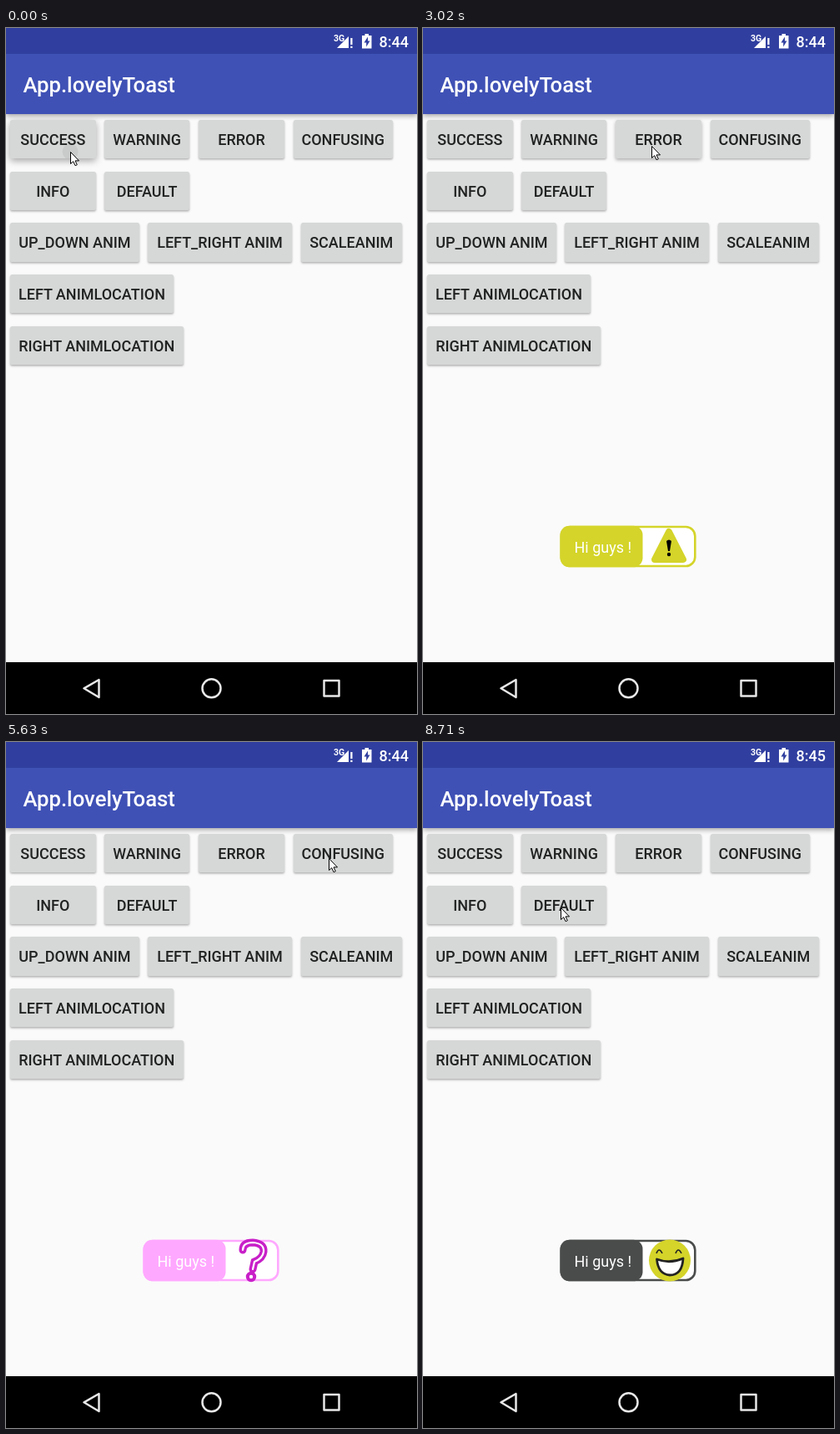
An HTML page that plays this animation: 493x821 px, repeating every 9090 ms.

```html
<!DOCTYPE html>
<html lang="en">
<head>
<meta charset="utf-8">
<title>Toast demo</title>
<style>
  html, body { margin: 0; width: 100%; height: 100%; overflow: hidden; background: #fafafa; }
  #stage { position: absolute; left: 0; top: 0; width: 493px; height: 821px; overflow: hidden; font-family: Roboto, sans-serif; }
  #stage > * { position: absolute; }
  #status { left: 0; top: 0; width: 493px; height: 31px; background: #303f9f; }
  #bar { left: 0; top: 30.8px; width: 493px; height: 71.9px; background: #3f51b5; box-shadow: 0 2px 6px rgba(0,0,0,.36); }
  #nav { left: 0; top: 759.4px; width: 493px; height: 62px; background: #000; }
  .button { height: 46.2px; border-radius: 2.6px; background: #d6d7d7; overflow: hidden;
    color: #202121; font-weight: 500; font-size: 18px; line-height: 47px; text-align: center; white-space: nowrap; }
  .button i { position: absolute; border-radius: 50%; background: #000; transform: translate(-50%, -50%); }
  svg { left: 0; top: 0; }
</style>
</head>
<body>
<div id="stage">
  <div id="bar"></div>
  <div id="status"></div>
  <div id="nav"></div>
  <svg id="overlay" width="493" height="821" viewBox="0 0 493 821">
    <g fill="#fff" font-weight="500">
      <text x="20.5" y="77" font-size="25.7">App.lovelyToast</text>
      <text x="393" y="15.5" font-size="10.5" font-weight="700">3G</text>
      <path d="M397 24L411 10V24Z"/>
      <path d="M413.3 12h2.2v8h-2.2zM413.3 21.8h2.2V24h-2.2z"/>
      <path d="M427 9h3.5V7h4.5v2h3.5v15.5H427Z"/>
      <path d="M434 10.5l-4.5 7h2.7v5l4.3-7h-2.5Z" fill="#303f9f"/>
      <text id="clock" x="447.5" y="22.5" font-size="18">8:44</text>
    </g>
    <g fill="none" stroke="#e8e8e8" stroke-width="2.5" stroke-linejoin="round">
      <path d="M93.5 790.3L111.5 780V801Z"/>
      <circle cx="246.5" cy="790.3" r="11"/>
      <rect x="381.5" y="781" width="18" height="18.5"/>
    </g>
    <g id="toasts"></g>
    <path id="cursor" d="M0 0V14L3.2 11.2L5.6 16.2L7.8 15.2L5.5 10.4H10Z" fill="#fff" stroke="#000"/>
  </svg>
</div>
<script>
const LOOP = 9090, SWAP = 720;
const byId = id => document.getElementById(id);
const clamp = v => Math.max(0, Math.min(1, v));
const ease = u => (1 - Math.cos(Math.PI * clamp(u))) / 2;
const mix = (a, b, u) => a + (b - a) * u;

// label, x, row, width
const buttons = [
  ['SUCCESS', 5, 0, 102.7], ['WARNING', 117.8, 0, 102.7], ['ERROR', 231, 0, 103], ['CONFUSING', 344.5, 0, 119.5],
  ['INFO', 5, 1, 102.7], ['DEFAULT', 117.8, 1, 102.7],
  ['UP_DOWN ANIM', 5, 2, 155], ['LEFT_RIGHT ANIM', 170, 2, 173], ['SCALEANIM', 353.5, 2, 121.5],
  ['LEFT ANIMLOCATION', 5, 3, 196], ['RIGHT ANIMLOCATION', 5, 4, 207.5]
].map(([label, x, row, width]) => {
  const el = document.createElement('div'), ripple = document.createElement('i');
  const y = 110.2 + row * 61.63;
  el.className = 'button';
  el.style.cssText = `left:${x}px;top:${y}px;width:${width}px`;
  el.append(label, ripple);
  byId('stage').insertBefore(el, byId('overlay'));
  return { el, ripple, x, y };
});

const icons = {
  thumb: `<g fill="#fff58a" stroke="#e0301e" stroke-width="2" stroke-linejoin="round">
    <path d="M166 640V618L174 613Q181 607 181 602Q183 598 188 598Q194 600 193 606L190 616H204Q209 617 208 622Q210 626 207 629Q208 633 205 635Q205 641 198 642L178 643Z"/>
    <path d="M190 616Q186 620 189 624H207M189 624Q186 629 190 630H206M190 630Q188 635 191 636H204" fill="#ffc59a"/>
    <path d="M170 620Q182 617 185 606" fill="none" stroke="#f0b429"/></g>`,
  triangle: `<path d="M295 603L312 636H278Z" fill="#d4d42a" stroke="#d4d42a" stroke-width="8" stroke-linejoin="round"/>
    <path d="M292 614Q295 611 298 614L296 626H294Z"/><circle cx="295" cy="630" r="2.2"/>`,
  cross: `<rect x="270" y="596" width="52" height="49" rx="8" fill="#d42a2a"/>
    <path d="M282 607L310 635M310 607L282 635" stroke="#fff" stroke-width="5.5" stroke-linecap="round"/>`,
  question: `<g fill="none" stroke-linecap="round">
    <path id="hook" d="M284 608Q284 599 296 599Q310 600 309 610Q308 618 298 622L296 631" stroke="#c81fc8" stroke-width="9"/>
    <path d="M284 608Q284 599 296 599Q310 600 309 610Q308 618 298 622L296 631" stroke="#fff" stroke-width="2.2"/></g>
    <circle cx="294" cy="640" r="4.2" fill="#fff" stroke="#c81fc8" stroke-width="4"/>`,
  bubble: `<rect x="271" y="596" width="51" height="49" rx="8" fill="#2ad42a"/>
    <g fill="#d8d8d8"><ellipse cx="296.5" cy="618.5" rx="13.5" ry="10.5"/><path d="M286 623L283.5 632L295 627Z"/></g>`,
  smile: `<circle cx="296" cy="620.5" r="25" fill="#d4d42a"/>
    <path d="M280 612Q283 604 287 612M303 612Q306 604 310 612" fill="none" stroke="#222" stroke-width="1.6"/>
    <path d="M280.5 619Q296 625 312 618Q311 638 296 638Q282 637 280.5 619Z" fill="#fff" stroke="#222" stroke-width="2.8" stroke-linejoin="round"/>`
};

function makeToast(color, icon, isSuccess) {
  const g = document.createElementNS('http://www.w3.org/2000/svg', 'g');
  const [x, width] = isSuccess ? [156, 181.5] : [164.5, 163];
  const [fillX, fillWidth] = isSuccess ? [219.5, 118] : [164.5, 99];
  g.innerHTML = `
    <rect x="${x + 1.2}" y="597" width="${width - 2.4}" height="47" rx="11" fill="#fff" stroke="${color}" stroke-width="2.6"/>
    <rect x="${fillX}" y="595.7" width="${fillWidth}" height="49.6" rx="11" fill="${color}"/>
    ${icons[icon]}
    <text x="${isSuccess ? 237 : 181.5}" y="627.5" font-size="18" fill="#fff">${isSuccess ? 'SUCCESS!!' : 'Hi guys !'}</text>`;
  byId('toasts').append(g);
  return g;
}

// press and toast start times; cursor position and the span of its arrival
const steps = [
  { press: -80, start: 20, at: [77, 148], move: [-2, -1], toast: makeToast('#2ad42a', 'thumb', true) },
  { press: 1270, start: 1350, at: [150.5, 134.5], move: [310, 750], toast: makeToast('#d4d42a', 'triangle') },
  { press: 3020, start: 3100, at: [274, 140.5], move: [2340, 2780], toast: makeToast('#d42a2a', 'cross') },
  { press: 4630, start: 4692, at: [387, 138.5], move: [3970, 4410], toast: makeToast('#ffa8ff', 'question') },
  { press: 6280, start: 6400, at: [73.5, 185], move: [5630, 6070], toast: makeToast('#2ad42a', 'bubble') },
  { press: 7850, start: 7972, at: [164.5, 197.5], move: [7450, 7690], toast: makeToast('#4a4c4b', 'smile') }
];

// The second swap stalls for a moment halfway.
const swapProgress = (step, t) => {
  const local = step === steps[1] && t > 1810 ? Math.max(1810, t - 380) : t;
  return ease((local - step.start) / SWAP);
};

function drawPress(button, step, t) {
  const age = t - step.press;
  const lift = age < 0 ? 0 : Math.min(.4 + age / 130, 1) * clamp((300 - age) / 110);
  button.el.style.boxShadow =
    `0 ${mix(1.5, 3, lift)}px ${mix(2.5, 8, lift)}px rgba(0,0,0,${mix(.3, .34, lift)})`;
  const size = Math.max(0, age - 60) * .9;
  const { style } = button.ripple;
  style.left = step.at[0] - button.x + 'px';
  style.top = step.at[1] - button.y + 'px';
  style.width = style.height = Math.min(size, 260) + 'px';
  style.opacity = .06 * clamp((600 - age) / 300);
}

function draw(t) {
  let [x, y] = steps[0].at;
  steps.forEach((step, i) => {
    drawPress(buttons[i], step, t);
    const arrival = ease((t - step.move[0]) / (step.move[1] - step.move[0]));
    x = mix(x, step.at[0], arrival);
    y = mix(y, step.at[1], arrival);

    const grown = swapProgress(step, t);
    const shrunk = i < steps.length - 1 ? swapProgress(steps[i + 1], t) : 0;
    const scale = grown * (1 - shrunk);
    step.toast.setAttribute('visibility', scale > .01 ? 'visible' : 'hidden');
    step.toast.setAttribute('opacity', grown);
    step.toast.setAttribute('transform', `translate(246.3 620.5) scale(${scale}) translate(-246.3 -620.5)`);
  });
  byId('cursor').setAttribute('transform', `translate(${Math.round(x) + .5} ${Math.round(y) + .5})`);
  byId('clock').textContent = t < 6900 ? '8:44' : '8:45';
}

buttons.slice(steps.length).forEach(b => b.el.style.boxShadow = '0 1.5px 2.5px rgba(0,0,0,.3)');

const origin = performance.now();
function frame() {
  draw((performance.now() - origin) % LOOP);
  requestAnimationFrame(frame);
}
frame();
</script>
</body>
</html>
```
